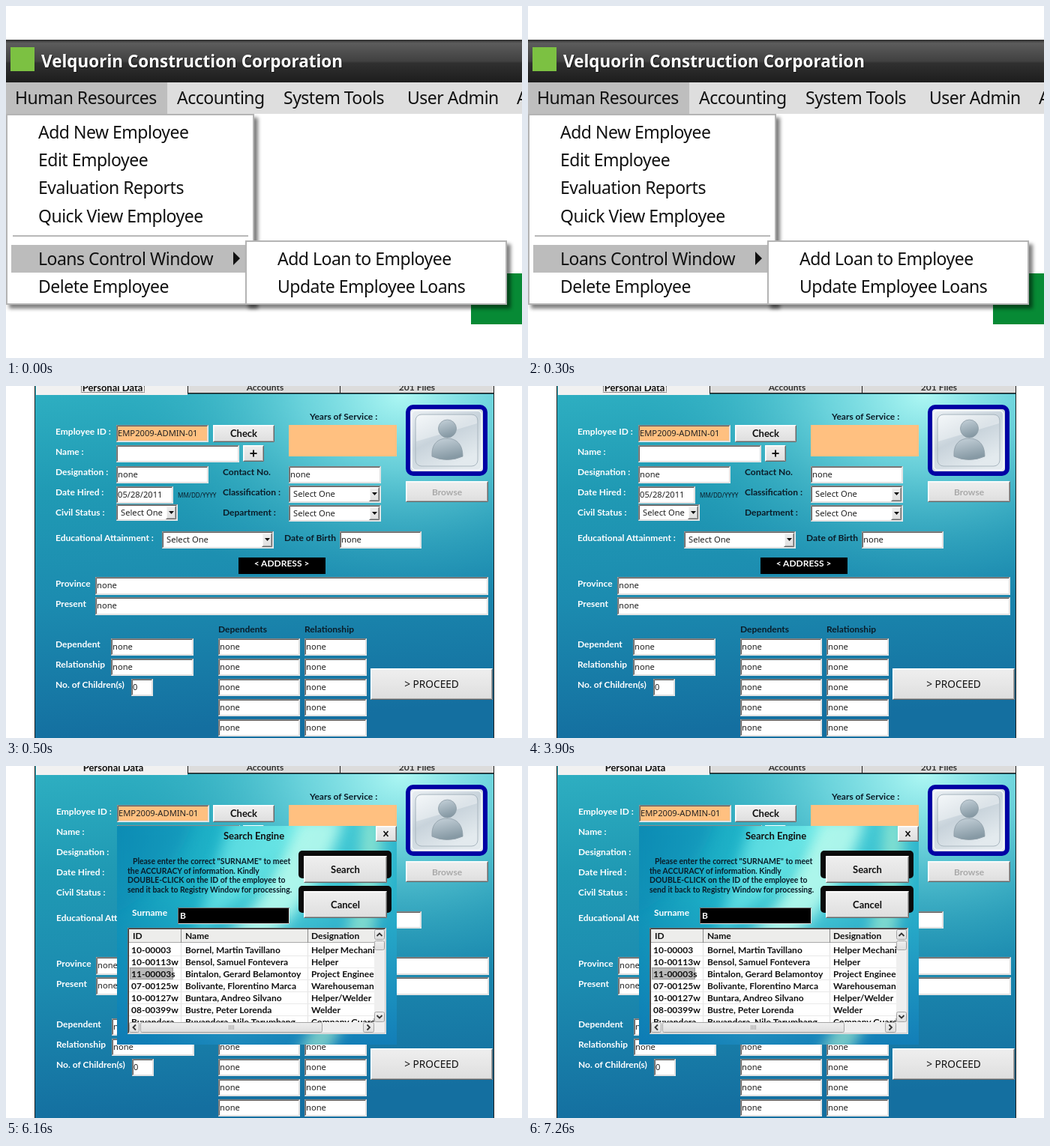
An HTML page for the animation above (8000 ms loop, 688x470 px).

```html
<!DOCTYPE html>
<html lang="en">
<head>
<meta charset="utf-8">
<title>Employee registry</title>
<style>
html, body { margin: 0; width: 100%; height: 100%; overflow: hidden; background: #fff; }
svg { position: absolute; left: 0; top: 0; display: block; }
text { white-space: pre; }
.menu { font: 23px "Noto Sans", sans-serif; letter-spacing: -.5px; }
.title { font: bold 22.5px "Noto Sans", sans-serif; }
.label { font: bold 12px Lato, sans-serif; }
.head { font: bold 13px Lato, sans-serif; }
.note { font: bold 10.4px Lato, sans-serif; }
.value { font: 11.2px "Noto Sans", sans-serif; }
.hint { font: 8.2px "Noto Sans", sans-serif; }
.big { font: 13.7px "Noto Sans", sans-serif; }
</style>
</head>
<body>
<svg id="stage" width="688" height="470" viewBox="0 0 688 470">
  <defs>
    <linearGradient id="bar" x2="0" y2="1">
      <stop offset="0" stop-color="#2b2b2b"/><stop offset=".08" stop-color="#5c5c5c"/>
      <stop offset=".5" stop-color="#414141"/><stop offset=".55" stop-color="#303030"/>
      <stop offset="1" stop-color="#1d1d1d"/>
    </linearGradient>
    <linearGradient id="sea" x2=".12" y2="1">
      <stop offset="0" stop-color="#2fb0c2"/><stop offset=".3" stop-color="#209ab4"/>
      <stop offset=".6" stop-color="#1c8cb0"/><stop offset="1" stop-color="#146fa0"/>
    </linearGradient>
    <radialGradient id="glow" cx=".8" cy="0" r=".62">
      <stop offset="0" stop-color="#b4fbf6" stop-opacity=".95"/>
      <stop offset=".35" stop-color="#8deaec" stop-opacity=".65"/>
      <stop offset=".7" stop-color="#5cccd6" stop-opacity=".28"/>
      <stop offset="1" stop-color="#35b0c4" stop-opacity="0"/>
    </radialGradient>
    <linearGradient id="deep" x2="1" y2=".25">
      <stop offset="0" stop-color="#0c8fb4"/><stop offset=".35" stop-color="#1fb3c8"/>
      <stop offset=".6" stop-color="#52d8da"/><stop offset="1" stop-color="#2cb4cc"/>
    </linearGradient>
    <linearGradient id="shade" x2="0" y2="1">
      <stop offset=".3" stop-color="#0a6cb0" stop-opacity="0"/>
      <stop offset="1" stop-color="#0a6cb0" stop-opacity=".75"/>
    </linearGradient>
    <linearGradient id="face" x2="0" y2="1">
      <stop offset="0" stop-color="#efefef"/><stop offset="1" stop-color="#dedede"/>
    </linearGradient>
    <linearGradient id="glass" x2=".6" y2="1">
      <stop offset="0" stop-color="#eef3f6"/><stop offset=".5" stop-color="#c8d3db"/>
      <stop offset="1" stop-color="#e3eaee"/>
    </linearGradient>
    <linearGradient id="person" x2=".3" y2="1">
      <stop offset="0" stop-color="#c6d2da"/><stop offset="1" stop-color="#8699a4"/>
    </linearGradient>
    <filter id="soft"><feGaussianBlur stdDeviation="2.5"/></filter>
    <filter id="hazy" x="-50%" y="-50%" width="200%" height="200%"><feGaussianBlur stdDeviation="9"/></filter>
    <clipPath id="boxClip"><rect x="148" y="80" width="373" height="292"/></clipPath>
    <clipPath id="listClip"><rect x="164" y="218" width="327" height="124"/></clipPath>
  </defs>
</svg>
<script>
const stage = document.getElementById('stage');
let layer = stage;

function add(tag, attrs, parent = layer) {
  const el = document.createElementNS('http://www.w3.org/2000/svg', tag);
  for (const key in attrs) el.setAttribute(key, attrs[key]);
  return parent.appendChild(el);
}
function group(draw, attrs = {}) {
  const outer = layer;
  const g = layer = add('g', attrs);
  draw();
  layer = outer;
  return g;
}
// Boxes are given by their left, top, right and bottom edges.
function box(l, t, r, b, fill, more = {}) {
  return add('rect', { x: l, y: t, width: r - l, height: b - t, fill, ...more });
}
function shape(d, fill, more = {}) {
  return add('path', { d, fill, ...more });
}
function text(str, x, y, cls, fill = '#111', anchor = 'start') {
  add('text', { x, y, class: cls, fill, 'text-anchor': anchor }).textContent = str;
}
function mid(str, x, y, cls, fill) {
  text(str, x, y, cls, fill, 'middle');
}
function bevel(l, t, r, b, light, dark) {
  shape(`M${l + .5} ${b - .5}V${t + .5}H${r - .5}`, 'none', { stroke: light });
  shape(`M${l + .5} ${b - .5}H${r - .5}V${t + .5}`, 'none', { stroke: dark });
}
function field(l, t, r, b, str = '', fill = '#fff') {
  box(l, t, r, b, fill);
  bevel(l, t, r, b, '#8a8a8a', '#e8e8e8');
  bevel(l + 1, t + 1, r - 1, b - 1, '#5c5c5c', '#dedede');
  text(str, l + 2, t + 15, 'value', '#222');
}
function button(l, t, r, b, str, cls = 'head', fill = '#111') {
  box(l, t, r, b, 'url(#face)');
  bevel(l, t, r, b, '#fff', '#666');
  bevel(l + 1, t + 1, r - 1, b - 1, '#f6f6f6', '#a8a8a8');
  mid(str, (l + r) / 2, (t + b) / 2 + 4.5, cls, fill);
}
function combo(l, t, r, b) {
  field(l, t, r, b);
  text('Select One', l + 6, t + 15, 'value', '#222');
  button(r - 16, t + 2, r - 2, b - 2, '');
  shape(`M${r - 12} ${t + 9}h7l-3.5 4z`, '#111');
}

function drawMenu() {
  box(0, 0, 688, 470, '#fff');
  box(620, 357, 688, 425, '#078a35');
  box(0, 45, 688, 102, 'url(#bar)');
  box(6, 55, 38, 87, '#7cc142');
  text('Velquorin Construction Corporation', 48, 83, 'title', '#111');
  text('Velquorin Construction Corporation', 47, 82, 'title', '#fff');

  box(0, 102, 688, 144, '#dedede');
  box(0, 102, 215, 144, '#bebebe');
  const tabs = [['Human Resources', 12], ['Accounting', 228], ['System Tools', 370],
    ['User Admin', 535], ['A', 681]];
  for (const [str, x] of tabs) text(str, x, 131, 'menu');

  const panel = (l, t, r, b) => {
    box(l + 4, t + 5, r + 5, b + 5, '#000', { opacity: .5, filter: 'url(#soft)' });
    box(l, t, r, b, '#fff');
    box(l + 1, t + 1, r - 1, b - 1, 'none', { stroke: '#b4b4b4', 'stroke-width': 2 });
  };
  panel(0, 144, 331, 399);
  box(9, 306, 323, 308, '#b8b8b8');
  box(7, 319, 320, 356, '#bcbcbc');
  const items = [['Add New Employee', 177], ['Edit Employee', 214], ['Evaluation Reports', 251],
    ['Quick View Employee', 289], ['Loans Control Window', 346], ['Delete Employee', 383]];
  for (const [str, y] of items) text(str, 43, y, 'menu');
  shape('M303 328v18l9-9z', '#111');

  panel(319, 313, 668, 399);
  text('Add Loan to Employee', 362, 346, 'menu');
  text('Update Employee Loans', 362, 383, 'menu');
}

function drawPhoto() {
  box(536, 28, 639, 117, 'url(#glass)', { rx: 7, stroke: '#0000a4', 'stroke-width': 6 });
  box(541, 33, 634, 112, 'none', { rx: 5, stroke: '#f6f9fb', 'stroke-width': 1.5 });
  box(546, 38, 629, 107, 'url(#glass)', { rx: 8, stroke: '#aab7c0' });
  shape('M547 74Q588 62 628 50V46Q628 39 621 39H554Q547 39 547 46Z', '#fff', { opacity: .35 });
  const edge = { stroke: '#8d9ca6', 'stroke-width': .8 };
  shape('M568 94C567 77 576 70 588 70S609 77 609 94Q588 103 568 94Z', 'url(#person)', edge);
  add('circle', { cx: 588.5, cy: 57, r: 12, fill: 'url(#person)', ...edge });
}

function drawBackdrop() {
  box(0, 0, 688, 470, '#fff');
  box(38, 0, 651, 470, 'url(#sea)');
  box(38, 11, 651, 470, 'url(#glow)');
  box(40, 0, 242, 12, '#f1f1f1');
  box(242, 0, 650, 9, '#dcdcdc');
  box(242, 9, 650, 10.5, '#1c1c1c');
  for (const x of [38, 242, 445, 650]) box(x, 0, x + 1, x === 38 || x === 650 ? 470 : 10, '#1c1c1c');
  mid('Accounts', 345.5, 6, 'label', '#333');
  mid('201 Files', 548, 6, 'label', '#333');
}

// Controls that sit one pixel further right while the search box is open.
function drawLeft() {
  mid('Personal Data', 142, 7, 'head');
  const labels = [['Employee ID :', 65], ['Name :', 92], ['Designation :', 119], ['Date Hired :', 146],
    ['Civil Status :', 173], ['Educational Attainment :', 207], ['Province', 268], ['Present', 295],
    ['Dependent', 349], ['Relationship', 376], ['No. of Children(s)', 403]];
  for (const [str, y] of labels) text(str, 66, y, 'label', '#fff');
  field(147, 52, 270, 75, 'EMP2009-ADMIN-01', '#ffc080');
  field(147, 79, 311, 102);
  field(147, 107, 270, 130, 'none');
  field(147, 134, 223, 157, '05/28/2011');
  combo(147, 158, 229, 180);
  combo(208, 194, 357, 217);
  field(119, 255, 643, 279, 'none');
  field(119, 282, 643, 306, 'none');
  field(140, 337, 250, 360, 'none');
  field(140, 364, 250, 387, 'none');
  field(167, 391, 196, 414, '0');
}

function drawRight() {
  const ink = '#0b1c28';
  const labels = [['Years of Service :', 405, 45], ['Contact No.', 289, 119], ['Classification :', 289, 146],
    ['Department :', 289, 173], ['Date of Birth', 371, 207], ['Dependents', 283, 329],
    ['Relationship', 398, 329]];
  for (const [str, x, y] of labels) text(str, x, y, 'label', ink);
  text('MM/DD/YYYY', 229, 149, 'hint', ink);
  button(276, 52, 358, 75, 'Check');
  button(316, 79, 344, 101, '');
  shape('M330 85.5v9M325.5 90h9', 'none', { stroke: '#111', 'stroke-width': 2 });
  box(377, 52, 521, 94, '#ffc080');
  field(377, 107, 500, 130, 'none');
  combo(377, 133, 500, 156);
  combo(377, 159, 500, 181);
  field(445, 194, 554, 217, 'none');
  box(310, 229, 426, 251, '#000');
  mid('< ADDRESS >', 367.5, 241, 'label', '#fff');
  for (let i = 0; i < 5; i++) {
    const y = 337 + 27 * i;
    field(283, y, 392, y + 23, 'none');
    field(398, y, 481, y + 23, 'none');
  }
  drawPhoto();
  button(533, 127, 643, 155, 'Browse', 'label', '#a9a9a9');
  button(486, 377, 649, 419, '> PROCEED', 'big');
}

function drawList() {
  box(162, 216, 507, 358, '#fff');
  bevel(162, 216, 507, 358, '#666', '#e4e4e4');
  bevel(163, 217, 506, 357, '#333', '#ccc');
  const rows = [
    ['10-00003', 'Bornel, Martin Tavillano', 'Helper Mechanic'],
    ['10-00113w', 'Bensol, Samuel Fontevera', 'Helper'],
    ['11-00003s', 'Bintalon, Gerard Belamontoy', 'Project Engineer'],
    ['07-00125w', 'Bolivante, Florentino Marca', 'Warehouseman'],
    ['10-00127w', 'Buntara, Andreo Silvano', 'Helper/Welder'],
    ['08-00399w', 'Bustre, Peter Lorenda', 'Welder'],
    ['Buyandera', 'Buyandera, Nilo Tarumbang', 'Company Guard']
  ];
  group(() => {
    box(164, 218, 491, 236, '#ededeb');
    box(164, 235, 491, 236, '#a9a9a9');
    for (const x of [233, 402]) {
      box(x, 218, x + 1, 236, '#8c8c8c');
      box(x, 236, x + 1, 342, '#e2e2e2');
    }
    text('ID', 169, 231, 'label');
    text('Name', 239, 231, 'label');
    text('Designation', 407, 231, 'label');
    rows.forEach((row, i) => box(164, 253 + 16 * i, 491, 254 + 16 * i, '#e9e9e9'));
    box(165.5, 269.5, 222.5, 284.5, '#bababa', { stroke: '#555', 'stroke-dasharray': '1 1' });
    rows.forEach((row, i) => {
      row.forEach((str, col) => text(str, [167, 239, 407][col], 250 + 16 * i, 'label'));
    });
  }, { 'clip-path': 'url(#listClip)' });

  const knob = (l, t, r, b) => box(l + .5, t + .5, r - .5, b - .5, 'url(#face)', { rx: 2, stroke: '#a5a5a5' });
  const arrow = d => shape(d, 'none', { stroke: '#333', 'stroke-width': 1.8 });
  box(491, 218, 505, 356, '#efefef');
  box(164, 342, 491, 356, '#efefef');
  knob(491, 218, 505, 232);
  knob(491, 233, 505, 246);
  knob(491, 328, 505, 342);
  knob(164, 342, 178, 356);
  knob(179, 342, 422, 356);
  knob(476, 342, 491, 356);
  arrow('M494.5 227l3.5-3.5 3.5 3.5');
  arrow('M494.5 333l3.5 3.5 3.5-3.5');
  arrow('M173 345.5l-3.5 3.5 3.5 3.5');
  arrow('M481.5 345.5l3.5 3.5-3.5 3.5');
  for (let x = 297; x < 305; x += 2) box(x, 346, x + 1, 352, '#aaa');
}

function drawSearch() {
  group(() => {
    box(148, 80, 521, 372, 'url(#deep)');
    box(148, 80, 521, 372, 'url(#shade)');
    const streak = (d, fill, opacity) => shape(d, fill, { opacity, filter: 'url(#hazy)' });
    streak('M290 230C340 190 370 130 385 70H450C430 140 390 200 340 240Z', '#c4fff0', .8);
    streak('M300 70H400L340 150L250 230Z', '#7af0ee', .6);
    streak('M385 390C440 300 470 200 475 70H500C505 200 480 300 425 390Z', '#b4f6d2', .6);
    streak('M140 70H250C235 120 200 170 140 200Z', '#0a86b4', .4);
  }, { 'clip-path': 'url(#boxClip)' });
  mid('Search Engine', 330.5, 98, 'head');
  button(493, 80, 521, 101, '');
  shape('M503.5 87l6 7M509.5 87l-6 7', 'none', { stroke: '#111', 'stroke-width': 1.6 });

  const note = ['Please enter the correct "SURNAME" to meet', 'the ACCURACY of information. Kindly',
    'DOUBLE-CLICK on the ID of the employee to', 'send it back to Registry Window for processing.'];
  note.forEach((str, i) => text(str, i ? 162 : 169, 131 + 12.7 * i, 'note', '#0b1c28'));

  box(390, 113, 514, 150, '#0a0a0a', { rx: 5 });
  button(397, 120, 508, 156, 'Search');
  box(390, 160, 514, 196, '#0a0a0a', { rx: 5 });
  button(397, 167, 508, 203, 'Cancel');

  text('Surname', 168, 200, 'label', '#fff');
  box(229, 189, 378, 211, '#000');
  bevel(229, 189, 378, 211, '#777', '#ddd');
  text('B', 232, 204, 'label', '#fff');
  drawList();
}

const menu = group(drawMenu);
let left, focus;
const form = group(() => {
  drawBackdrop();
  left = group(drawLeft);
  drawRight();
  focus = box(100.5, -2, 184.5, 8.5, 'none', { stroke: '#222', 'stroke-dasharray': '1 1' });
});
const search = group(drawSearch);

const LOOP = 8000, FORM_AT = 500, SEARCH_AT = 6160;
const show = (el, on) => el.setAttribute('display', on ? 'inline' : 'none');
const start = performance.now();

function render() {
  const t = (performance.now() - start) % LOOP;
  const searching = t >= SEARCH_AT;
  show(menu, t < FORM_AT);
  show(form, t >= FORM_AT);
  show(search, searching);
  show(focus, !searching);
  left.setAttribute('transform', `translate(${searching ? 1 : 0} 0)`);
  requestAnimationFrame(render);
}
render();
</script>
</body>
</html>
```
